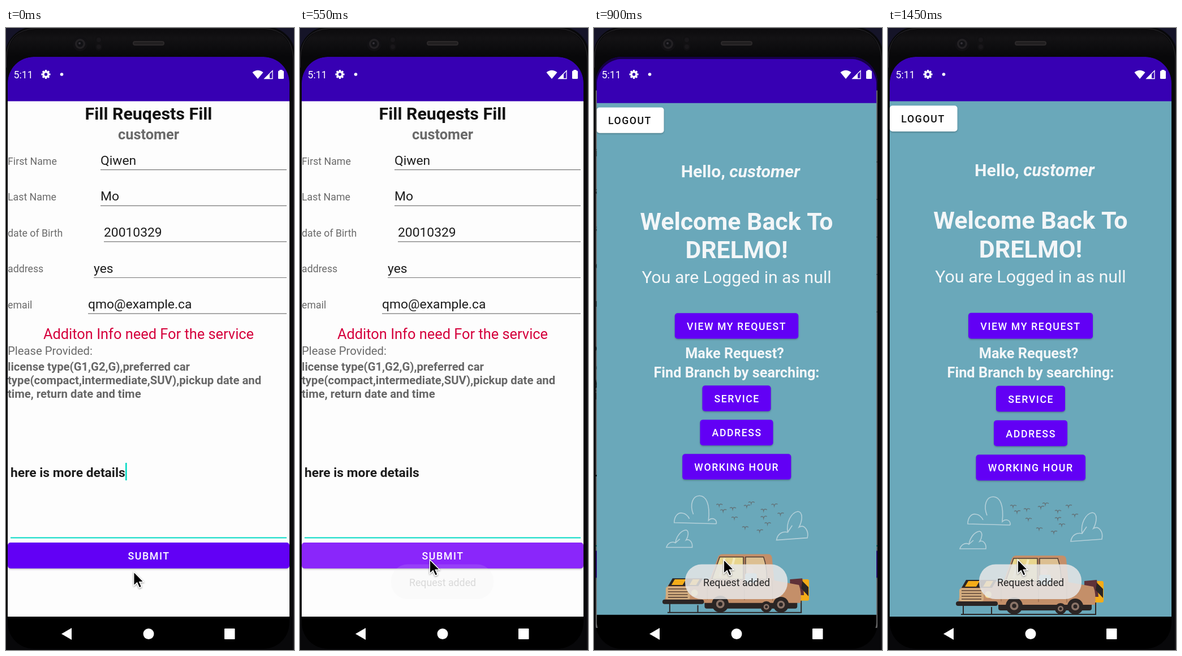
An HTML page with a canvas that plays this animation: 509x1100 px, repeating every 1500 ms.

```html
<!DOCTYPE html>
<html lang="en">
<head>
<meta charset="utf-8">
<title>Request form</title>
<style>
html, body { margin: 0; width: 509px; height: 1100px; overflow: hidden; background: #000; }
canvas { display: block; }
</style>
</head>
<body>
<canvas id="stage" width="509" height="1100"></canvas>
<script>
const ctx = document.getElementById('stage').getContext('2d');
const LOOP = 1500, STEP = 50, CENTER = { x: 252, y: 573 };
const PURPLE = '#6200f5', TEAL = '#03dac5', GREY = '#6a6a6a', INK = '#1c1c1c';

const clamp = v => Math.min(1, Math.max(0, v));
const ramp = (t, from, to) => clamp((t - from) / (to - from));

function text(str, x, y, size, color, style = '', align = 'left', spacing = 0) {
  ctx.font = `${style} ${size}px Roboto, sans-serif`;
  ctx.letterSpacing = spacing + 'px';
  ctx.textAlign = align;
  ctx.fillStyle = color;
  ctx.fillText(str, x, y);
}
function box(x, y, w, h, color, r = 0) {
  ctx.fillStyle = color;
  ctx.beginPath();
  ctx.roundRect(x, y, w, h, r);
  ctx.fill();
}
function disc(x, y, r, color) {
  ctx.fillStyle = color;
  ctx.beginPath();
  ctx.arc(x, y, r, 0, 7);
  ctx.fill();
}
function shape(d, fill, stroke, width = 1) {
  const path = new Path2D(d);
  if (fill) { ctx.fillStyle = fill; ctx.fill(path); }
  if (stroke) { ctx.strokeStyle = stroke; ctx.lineWidth = width; ctx.stroke(path); }
}
function clipScreen() {
  ctx.beginPath();
  ctx.roundRect(3, 51, 498, 1047, 46);
  ctx.clip();
}
function button(label, x, y, w, color = PURPLE, ink = '#fff', textX = x + 21.3) {
  ctx.save();
  ctx.shadowColor = 'rgba(0,0,0,.25)';
  ctx.shadowBlur = 3;
  ctx.shadowOffsetY = 1.5;
  box(x, y, w, 45.7, color, 5);
  ctx.restore();
  text(label, textX, y + 29.8, 17.75, ink, '500', 'left', 1.585);
}

function drawPhone() {
  box(0, 0, 509, 1100, '#151428');
  box(-1, -2, 512, 1160, '#08080a', 50);
  const shine = ctx.createLinearGradient(0, 0, 0, 50);
  shine.addColorStop(0, '#0b0a0c');
  shine.addColorStop(.35, '#131214');
  shine.addColorStop(1, '#08080a');
  box(2, 1, 504, 100, shine, 50);
  shape('M.5 70V54Q2 4 52 .5H457Q505 4 508 54V1100', null, '#2a282c', 1);
  disc(131, 28, 13, '#111013');
  disc(131, 28, 9, '#232124');
  disc(131, 28, 5.5, '#111114');
  disc(130, 27, 2, '#343238');
  box(158, 14, 12, 26, '#111012', 6);
  disc(164, 21, 4, '#19171a');
  disc(164, 33, 4, '#19171a');
  box(224, 23, 56, 8, '#2c292a', 4);
  box(226, 25, 52, 4, '#211f20', 2);
}

function drawForm(t) {
  box(3, 129.6, 498, 912, '#fdfdfd');
  text('Fill Reuqests Fill', 252, 162, 30.4, '#111', 'bold', 'center');
  text('customer', 252, 197.3, 25.4, GREY, 'bold', 'center');
  [
    ['First Name', 'Qiwen', 167],
    ['Last Name', 'Mo', 167],
    ['date of Birth', '20010329', 173],
    ['address', 'yes', 155],
    ['email', 'qmo@example.ca', 145],
  ].forEach(([label, value, x], i) => {
    const y = 241.5 + i * 63.6;
    text(label, 3, y, 17.75, GREY);
    text(value, x, y + .3, 22.85, INK);
    box(x, y + 8.6, 496 - x, 1.2, '#777');
  });
  text('Additon Info need For the service', 252, 549.7, 25.4, '#d5003c', '', 'center');
  text('Please Provided:', 3, 578, 20.3, GREY);
  ['license type(G1,G2,G),preferred car',
   'type(compact,intermediate,SUV),pickup date and',
   'time, return date and time'
  ].forEach((line, i) => text(line, 3, 605.7 + i * 24, 20.3, '#666', 'bold'));
  text('here is more details', 8, 794, 22.85, INK, 'bold');
  if (t < 150) box(211, 769, 2.6, 31, TEAL);
  box(8, 900.6, 488, 1.9, TEAL);

  const press = ramp(t, 380, 480) * (1 - ramp(t, 580, 720));
  const mix = (a, b) => Math.round(a + (b - a) * press);
  button('SUBMIT', 3, 910, 498, `rgb(${mix(98, 138)},${mix(0, 38)},${mix(245, 250)})`, '#fff', 215.5);
}

function drawScenery() {
  const line = '#b4d0d9';
  shape('M216 879L141 877C141 865 148 858 156 860C163 861 166 866 168 870M175 862C168 844 174 829 186 829C198 829 205 844 202 873C208 867 217 870 216 879', null, line, 1.6);
  shape('M127 921C130 912 138 910 143 913C145 901 153 891 162 890C168 892 166 902 162 908C168 905 174 912 173 921ZM143 913L151 906', null, line, 1.6);
  shape('M323 908C325 896 334 892 343 894C340 877 349 859 361 857C371 858 369 874 363 885C373 879 381 892 378 904ZM343 894L351 882', null, line, 1.6);
  [[221, 847], [228, 856], [245, 851], [270, 849], [278, 842], [319, 845], [300, 856],
   [330, 862], [248, 868], [300, 869], [267, 886], [293, 891], [307, 880]
  ].forEach(([x, y], i) =>
    shape(`M${x - 5} ${y - 2 + i % 3}q4-3 5 2q1-5 6-${2 + i % 2}`, null, '#63757b', 1.5));
}

function drawCar() {
  const body = '#c48f69', dark = '#2b2524', amber = '#f4ac19';
  shape('M129 1037H368', null, dark, 2);
  shape('M133 1018V1037M183 1024V1037M367 1012V1037', null, dark, 2);
  box(361, 978, 20, 38, amber, 3);
  shape('M347 978L369 976L372 1006H347Z', '#5f3138');
  shape('M369 981L380 992V1008L367 994Z', dark);
  box(195, 1012, 165, 18, dark, 4);
  shape('M124 1016L130 988L205 977L219 938Q221 933 227 933H308Q314 933 315 939L319 980L363 988Q368 1000 366 1020H124Z', body);
  shape('M208 978L222 938H264V978Z', '#e8d58d', '#4b3a32', 1.5);
  shape('M231 940L222 973M248 940L239 973', null, '#f3e9ba', 4);
  shape('M268 938H300Q306 955 306 978H268Z', '#dcbf91', '#4b3a32', 1.5);
  disc(276, 962, 6, '#efc6ac');
  box(267, 967, 21, 17, '#a5d6e9', 4);
  shape('M266 938V1015M316 980V1016M200 983V1014', null, '#96694c', 1.2);
  shape('M130 990L138 976H192L184 990Z', dark);
  shape('M136 988L142 978H162L156 988ZM168 988L174 978H186L180 988Z', amber);
  box(126, 991, 43, 23, '#d3ad80', 4);
  for (let y = 995; y < 1014; y += 5) shape(`M130 ${y}H165`, null, '#574135', 1.6);
  disc(177, 1002, 6, '#f8dd8c');
  box(120, 1014, 74, 8, dark, 4);
  for (const [x, r] of [[305, 10], [223, 15], [331, 14]]) {
    disc(x, 1037 - r, r, dark);
    disc(x, 1037 - r, r * .5, '#8b7468');
    disc(x, 1037 - r, r * .25, dark);
  }
}

function drawHome() {
  const white = '#f3f6f8';
  box(3, 129.6, 498, 912, '#6aa8ba');
  button('LOGOUT', 3, 137.3, 119.6, '#fff', '#111', 23.3);
  text('Hello, ', 153, 262, 30.4, white, 'bold');
  const indent = ctx.measureText('Hello, ').width;
  text('customer', 153 + indent, 262, 30.4, white, 'italic bold');
  text('Welcome Back To', 252, 355, 43.1, white, 'bold', 'center');
  text('DRELMO!', 252, 405.5, 43.1, white, 'bold', 'center');
  text('You are Logged in as null', 252, 450, 30.4, white, '', 'center');
  button('VIEW MY REQUEST', 142, 503.7, 220);
  text('Make Request?', 248.5, 584, 25.4, white, 'bold', 'center');
  text('Find Branch by searching:', 252, 618, 25.4, white, 'bold', 'center');
  button('SERVICE', 191, 632.8, 122);
  button('ADDRESS', 187, 693.7, 130);
  button('WORKING HOUR', 155.5, 754.5, 193.5);
  drawScenery();
  drawCar();
}

// An app window with its own status and navigation backgrounds, scaled about the screen centre.
function drawWindow(scale, alpha, content) {
  ctx.save();
  ctx.globalAlpha = alpha;
  ctx.translate(CENTER.x, CENTER.y);
  ctx.scale(scale, scale);
  ctx.translate(-CENTER.x, -CENTER.y);
  clipScreen();
  box(3, 51, 498, 82, '#3700b3');
  content();
  box(3, 1041, 498, 59, '#000');
  ctx.restore();
}

function drawSystemIcons() {
  text('5:11', 13.5, 89, 17.75, '#fff');
  for (let i = 0; i < 4; i++) {
    ctx.save();
    ctx.translate(70.5, 82);
    ctx.rotate(i * Math.PI / 4);
    box(-1.8, -8, 3.6, 16, '#fff', 1);
    ctx.restore();
  }
  disc(70.5, 82, 6, '#fff');
  disc(70.5, 82, 2.7, '#3700b3');
  disc(98.5, 82, 2.8, '#fff');
  shape('M445 90L435.5 78.5Q445 71 454.5 78.5Z', '#fff');
  shape('M457 89.5L471 75.5V89.5Z', null, '#fff', 1.3);
  shape('M456.5 90L466 80.5V90Z', '#fff');
  box(483.5, 74, 5, 4, '#fff');
  box(481, 75.5, 10, 14.5, '#fff', 1.5);
  shape('M98 1071.5L116 1061V1082Z', '#fff');
  disc(252, 1071.5, 9.5, '#fff');
  box(386, 1062, 18.5, 19, '#fff', 1);
}

function drawToast(t) {
  ctx.save();
  ctx.globalAlpha = ramp(t, 490, 890);
  box(161, 948.5, 181, 61.5, 'rgba(232,232,232,.85)', 29);
  text('Request added', 252, 986.5, 17.75, '#222', '', 'center');
  ctx.restore();
}

function drawCursor(t) {
  const move = 1 - (1 - ramp(t, 0, 250)) ** 2;
  ctx.save();
  ctx.translate(226 + 3.5 * move, 962 - 21.5 * move);
  ctx.shadowColor = 'rgba(0,0,0,.35)';
  ctx.shadowBlur = 3;
  ctx.shadowOffsetY = 1;
  shape('M0 0V24L5.5 19L9.5 28L13.5 26.2L9.7 17.7H17Z', '#000', '#fff', 1.8);
  ctx.shadowColor = 'transparent';
  shape('M.5 1.5V22.5L6 17.5L10 26.5L12.5 25.5L8.5 16.7H15.5Z', '#000');
  ctx.restore();
}

function draw(t) {
  const u = 1 - (1 - ramp(t, 725, 1125)) ** 2.5;
  const open = u * u * (3 - 2 * u);
  const reveal = ramp(t, 760, 810);

  drawPhone();
  ctx.save();
  clipScreen();
  if (open < .99) {
    drawWindow(1 + .05 * open, 1, () => drawForm(t));
    box(3, 51, 498, 1047, `rgba(0,0,0,${.6 * reveal})`);
  }
  if (reveal) drawWindow(open < .99 ? .95 + .05 * open : 1, reveal, drawHome);
  ctx.restore();
  drawSystemIcons();
  if (t > 490) drawToast(t);
  drawCursor(t);
}

function tick() {
  draw(Math.floor(performance.now() % LOOP / STEP) * STEP);
  requestAnimationFrame(tick);
}
tick();
</script>
</body>
</html>
```
